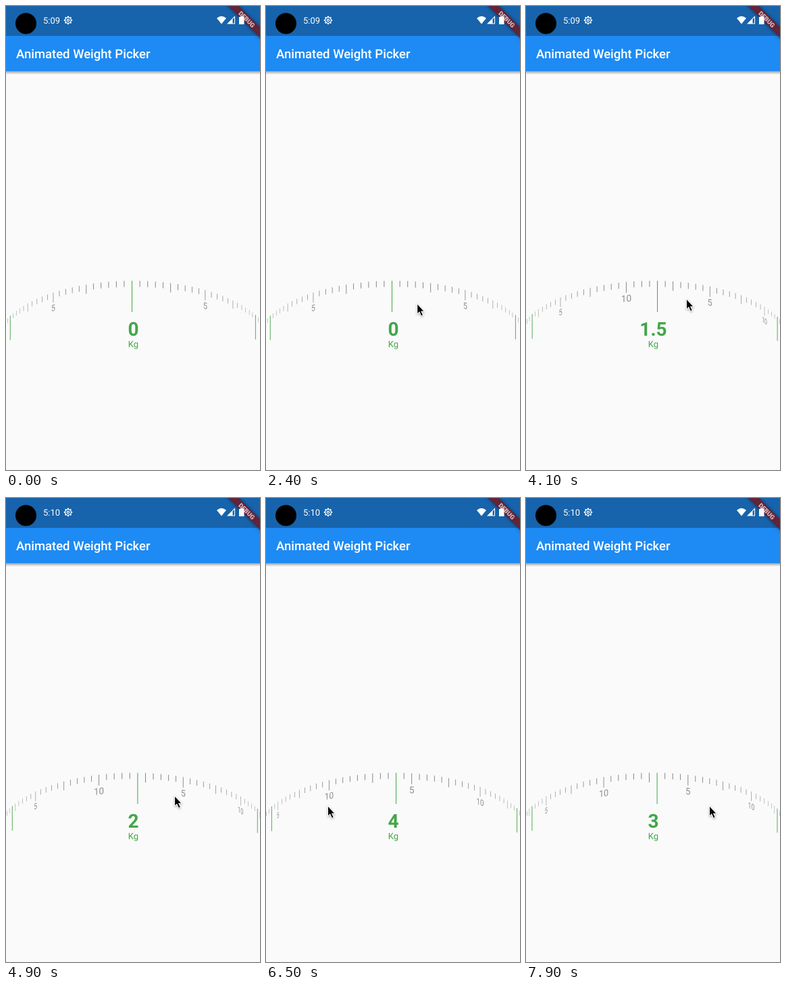
Write an HTML page with a canvas that moves like this. It is 376 px wide and 684 px high and loops after 8 s.

```html
<!DOCTYPE html>
<html lang="en">
<head>
<meta charset="utf-8">
<title>Animated Weight Picker</title>
<style>
  html, body { margin: 0; width: 100%; height: 100%; overflow: hidden; background: #fafafa; }
  canvas { display: block; }
</style>
</head>
<body>
<canvas id="stage" width="376" height="684"></canvas>
<script>
const ctx = document.getElementById('stage').getContext('2d');
ctx.textRendering = 'geometricPrecision';
const LOOP = 8000, STEP = 100;
const BAR = '#1763ac', GREEN = '#43a649', GRAY = '#858585';

// Wheel: 21 looping items (0 to 10 in halves) on a cylinder seen in perspective
const ITEMS = 21, RADIUS = 442, ANGLE = 0.0263, DEPTH = 1.865;
const CENTER_X = 188.5, TOP = 405, HORIZON = 640;

// Key points: time, then scroll position in ticks
const scrollKeys = [
  [2500, 0.17], [3000, 1.2], [4100, 2.48], [5600, 4.24], [6500, 7.65], [7900, 5.52]
];
// Key points: time, then pointer x and y
const pointerKeys = [
  [100, 163, 632], [400, 181, 529], [1500, 218, 477], [2300, 225, 440],
  [3000, 212, 440], [4100, 238, 433], [5600, 260, 446], [6500, 92, 455], [7900, 272, 455]
];
// One drag in every period once the wheel starts moving
const isPressed = t => t > 2600 && (t - 2700) % 1500 < 600;

const pointerShape = new Path2D('M0 0V13L3 10.3L5.8 16.4L7.6 15.6L4.9 9.7H9z');
const wifiShape = new Path2D('M319 26.5L312 18Q319 12 326 18z');
const signalShape = new Path2D('M327 26.5L339 14.5V26.5z');
const signalGap = new Path2D('M335.5 25.5V19.5L338 17V25.5z');

function sample(keys, t) {
  const next = keys.findIndex(k => k[0] > t);
  if (next < 0) return keys[keys.length - 1].slice(1);
  if (next === 0) return keys[0].slice(1);
  const a = keys[next - 1], b = keys[next];
  const u = (t - a[0]) / (b[0] - a[0]), e = u * u * (3 - 2 * u);
  return a.slice(1).map((v, i) => v + (b[i + 1] - v) * e);
}

function text(str, x, y, font, color, align = 'left') {
  ctx.font = font + ' Roboto, sans-serif';
  ctx.fillStyle = color;
  ctx.textAlign = align;
  ctx.fillText(str, x, y);
}

function rect(x, y, w, h, color) {
  ctx.fillStyle = color;
  ctx.fillRect(x, y, w, h);
}

function fill(path, color) {
  ctx.fillStyle = color;
  ctx.fill(path);
}

function circle(x, y, r) {
  const path = new Path2D();
  path.arc(x, y, r, 0, Math.PI * 2);
  return path;
}

function stroke(path, color, width) {
  ctx.strokeStyle = color;
  ctx.lineWidth = width;
  ctx.stroke(path);
}

function drawGear(x, y) {
  ctx.save();
  ctx.translate(x, y);
  stroke(circle(0, 0, 4.4), '#fff', 1.3);
  stroke(circle(0, 0, 1.6), '#fff', 1.2);
  for (let i = 0; i < 8; i++) {
    rect(-1, -6.2, 2, 2, '#fff');
    ctx.rotate(Math.PI / 4);
  }
  ctx.restore();
}

function drawBanner() {
  ctx.save();
  ctx.translate(376, 0);
  ctx.rotate(Math.PI / 4);
  ctx.shadowColor = 'rgba(0,0,0,.5)';
  ctx.shadowBlur = 5;
  rect(-50, 22.3, 100, 10.8, '#632338');
  ctx.shadowBlur = 0;
  text('DEBUG', 0, 31, '900 9.3px', '#d9bcc2', 'center');
  ctx.restore();
}

function drawHeader(time) {
  const shadow = ctx.createLinearGradient(0, 96, 0, 101);
  shadow.addColorStop(0, 'rgba(0,0,0,.36)');
  shadow.addColorStop(1, 'rgba(0,0,0,0)');
  rect(0, 96, 376, 5, shadow);
  rect(0, 0, 376, 44, BAR);
  rect(0, 44, 376, 52, '#1e8af3');
  text('Animated Weight Picker', 15, 77, '500 18.5px', '#fff');
  drawBanner();

  fill(circle(29.5, 25.8, 15.5), '#000');
  text(time, 55, 26, '13px', '#fff');
  drawGear(92, 21);
  fill(wifiShape, '#fff');
  fill(signalShape, '#fff');
  fill(signalGap, BAR);
  rect(345, 16, 7.5, 11, '#fff');
  rect(347, 14.8, 3.5, 1.5, '#fff');
}

function drawWheel(scroll, selected) {
  for (let i = selected - 24; i <= selected + 24; i++) {
    const item = (i + 2 * ITEMS) % ITEMS;
    const angle = (i - scroll) * ANGLE;
    const x = RADIUS * Math.sin(angle);
    const scale = 1 / (1 + DEPTH * (1 - Math.cos(angle)));
    const shrink = -scale * scale * DEPTH / RADIUS * Math.sin(angle);
    const narrow = scale * Math.cos(angle) + x * shrink;

    // Labels next to the selected item are hidden
    const active = item === selected;
    const labelled = item > 0 && item % 10 === 0 && Math.abs(item - selected) % (ITEMS - 1) > 1
      && Math.abs(item - selected) < ITEMS - 1;
    const length = active ? 46 : labelled ? 16 : item % 10 === 5 ? 14 : 9;
    const width = Math.max(1, (active ? 0.9 : 0.45) / narrow);

    ctx.save();
    ctx.translate(CENTER_X + x * scale, HORIZON);
    ctx.save();
    ctx.scale(narrow, scale);
    rect(-width / 2, TOP - HORIZON, width, length, active ? GREEN : GRAY);
    ctx.restore();
    if (labelled) {
      const y = TOP + 24.5 - HORIZON;
      ctx.transform(narrow, y * shrink, 0, scale, 0, y * scale);
      text(item / 2, 0, 5, '14px', '#8e8e8e', 'center');
    }
    ctx.restore();
  }
}

function drawPointer(t) {
  const [x, y] = sample(pointerKeys, t);
  if (isPressed(t)) stroke(circle(x + 1, y + 2, 19.8), '#000', 3);
  ctx.save();
  ctx.translate(x, y);
  ctx.shadowColor = 'rgba(0,0,0,.35)';
  ctx.shadowBlur = 3;
  ctx.shadowOffsetY = 1;
  stroke(pointerShape, '#fff', 2);
  ctx.shadowColor = 'transparent';
  fill(pointerShape, '#000');
  ctx.restore();
}

function draw(now) {
  const t = Math.floor((now % LOOP) / STEP) * STEP;
  const [scroll] = sample(scrollKeys, t);
  const selected = Math.floor(scroll + 0.68);
  rect(0, 0, 376, 684, '#fafafa');
  drawHeader(t < 4900 ? '5:09' : '5:10');
  drawWheel(scroll, selected);
  text(selected / 2, 188.5, 486, 'bold 28px', GREEN, 'center');
  text('Kg', 188.5, 503, '13px', GREEN, 'center');
  if (t >= 100) drawPointer(t);
}

const start = performance.now();
function frame() {
  draw(performance.now() - start);
  requestAnimationFrame(frame);
}
frame();
</script>
</body>
</html>
```
